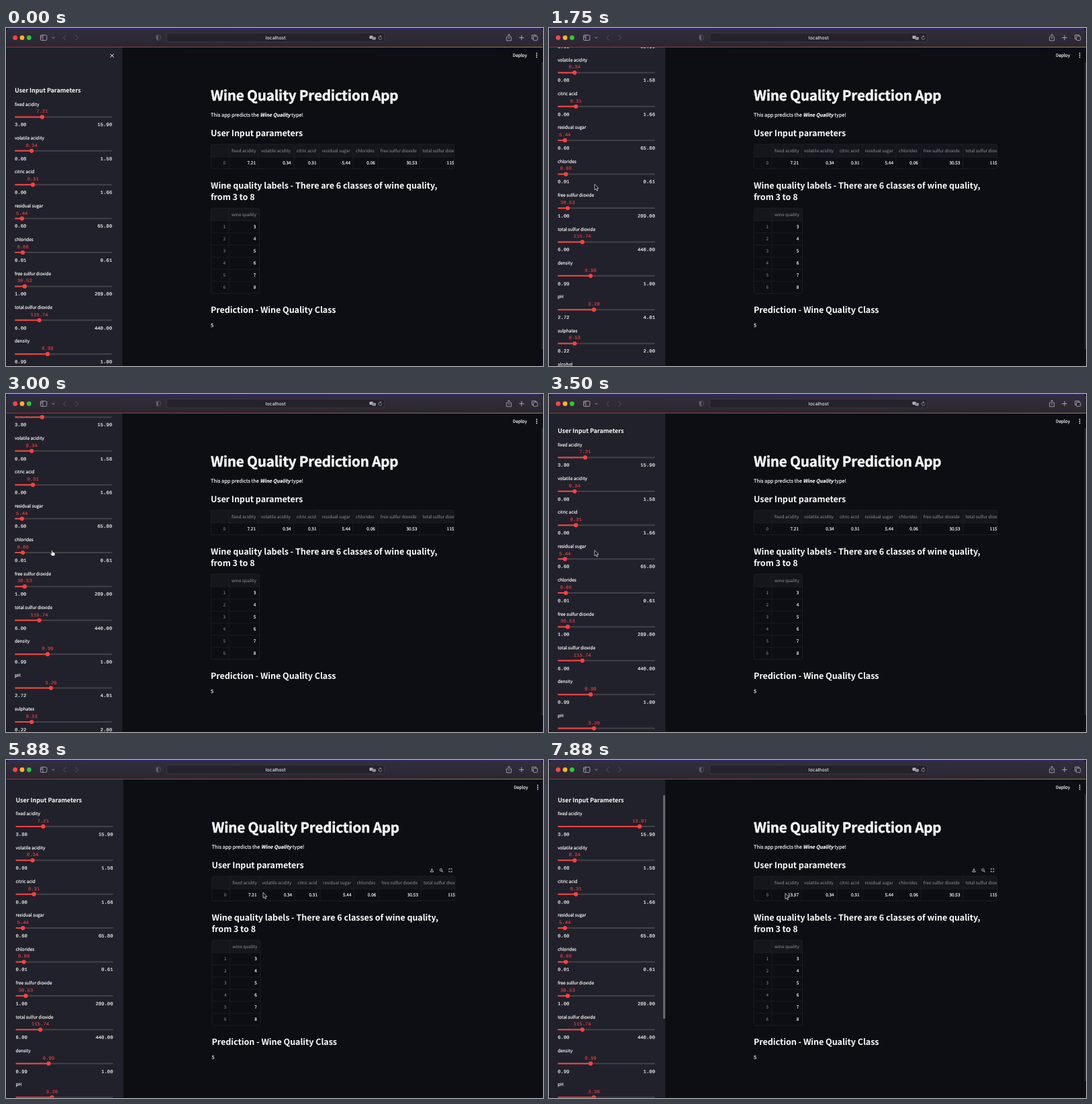
Write an HTML page that moves like this. It is 800 px wide and 503 px high and loops after 8 s.

```html
<!DOCTYPE html>
<html lang="en">
<head>
<meta charset="utf-8">
<title>Wine Quality Prediction App</title>
<style>
html, body { margin: 0; width: 100%; height: 100%; overflow: hidden; background: #0c0e13; }
svg { display: block; width: 800px; height: 503px; text-rendering: geometricPrecision; }
text { font-family: "Noto Sans CJK SC", "Noto Sans CJK JP", "Noto Sans CJK", "Noto Sans", sans-serif;
  font-size: 6.46px; fill: #fafafa; white-space: pre; }
.mono { font-family: "Liberation Mono", monospace; font-size: 7.25px; stroke: #fafafa; stroke-width: .15px; }
.red { fill: #e04043; stroke: #e04043; }
.h1 { font-size: 20.6px; font-weight: 700; letter-spacing: -.17px; stroke: #fafafa; stroke-width: .45px; }
.h2 { font-size: 12.55px; font-weight: 700; letter-spacing: -.06px; }
.h3 { font-size: 9px; font-weight: 700; letter-spacing: -.04px; }
.body { font-size: 7.39px; font-weight: 500; stroke: #fafafa; stroke-width: .15px; }
.em { font-size: 7.2px; font-weight: 700; font-style: italic; }
.cell { font-weight: 500; stroke: #fafafa; stroke-width: .18px; }
.dim { fill: #94969d; }
.ui { font-family: Inter, Roboto, sans-serif; font-size: 6.9px; font-weight: 500; fill: #e6e4ea; }
.end { text-anchor: end; }
.mid { text-anchor: middle; }
.line { fill: none; stroke-linecap: round; stroke-linejoin: round; }
</style>
</head>
<body>
<svg id="stage" viewBox="0 0 800 503" xmlns="http://www.w3.org/2000/svg"></svg>
<script>
const LOOP = 8000, STEP = 125;
const LEFT = 13, TRACK = 145, PITCH = 50.4;
const BG = '#0c0e13';

// name, min, max, value, optional position along the track
const sliders = [
  ['fixed acidity', 3.8, 15.9, 7.21],
  ['volatile acidity', 0.08, 1.58, 0.34],
  ['citric acid', 0, 1.66, 0.31],
  ['residual sugar', 0.6, 65.8, 5.44],
  ['chlorides', 0.01, 0.61, 0.06],
  ['free sulfur dioxide', 1, 289, 30.53],
  ['total sulfur dioxide', 6, 440, 115.74],
  ['density', 0.99, 1, 0.99, 0.338],
  ['pH', 2.72, 4.01, 3.2],
  ['sulphates', 0.22, 2, 0.53],
  ['alcohol', 8, 14.9, 10.5]
];

// keys: time, then values
const scrollKeys = [[1250, 0], [1500, 58], [1750, 116.4], [2125, 178], [2500, 197.8],
  [2625, 197.8], [2750, 176], [3000, 98], [3250, 56], [3500, 38], [3750, 33.5]];
const cursorKeys = [[125, 804, 330], [875, 445, 300], [1250, 68, 232.5], [3625, 68, 232.5],
  [4250, 314.3, 143.5], [4375, 314.3, 143.5], [4750, 72, 95.5], [5125, 72, 95.5],
  [5750, 383, 197], [6000, 383, 197], [6750, 53, 95.5], [6875, 53, 95.5],
  [7375, 134, 95.5], [7625, 290, 150], [7875, 352, 198.3]];
const shiftKeys = [[5125, 0], [5500, 1.5], [6125, 1.5], [6625, 0]];
const acidKeys = [[6875, 7.21], [7375, 13.97]];

function at(keys, t) {
  if (t <= keys[0][0]) return keys[0].slice(1);
  for (let i = 1; i < keys.length; i++) {
    const a = keys[i - 1], b = keys[i];
    if (t <= b[0]) {
      const p = (t - a[0]) / (b[0] - a[0]);
      return a.slice(1).map((v, k) => v + (b[k + 1] - v) * p);
    }
  }
  return keys[keys.length - 1].slice(1);
}

const text = (x, y, s, cls = '', more = '') => `<text x="${x}" y="${y}" class="${cls}" ${more}>${s}</text>`;
const rect = (x, y, w, h, fill, more = '') => `<rect x="${x}" y="${y}" width="${w}" height="${h}" fill="${fill}" ${more}/>`;
const circle = (x, y, r, fill, more = '') => `<circle cx="${x}" cy="${y}" r="${r}" fill="${fill}" ${more}/>`;
const path = (d, stroke, w = 0.8, more = '') => `<path d="${d}" class="line" stroke="${stroke}" stroke-width="${w}" ${more}/>`;

function toolbar() {
  const c = '#b9b6c0', dim = '#58545f';
  return rect(0, 0, 800, 28.2, 'url(#bar)') + rect(0, 0, 800, 1, 'url(#edge)') +
    rect(0, 28, 800, 1, 'url(#deco)') +
    [['#fb4641', 13.6], ['#f5b52e', 24], ['#2fc740', 34.3]].map(([f, x]) => circle(x, 14.4, 3.4, f)).join('') +
    rect(51.4, 10.6, 9.4, 7.8, 'none', `rx="1.5" stroke="${c}" stroke-width=".8"`) +
    path('M54.8 10.8V18.2M52.6 12.6h1M52.6 14.2h1', c, 0.7) +
    path('M68.7 13.7l1.7 1.7 1.7-1.7', c) +
    path('M89 11l-3.4 3.5 3.4 3.5M104 11l3.4 3.5-3.4 3.5', dim, 1) +
    path('M227 10.5l3.2 1.2v3q0 2.6-3.2 4q-3.2-1.4-3.2-4v-3z', dim, 0.8) +
    '<path d="M227 10.5l-3.2 1.2v3q0 2.6 3.2 4z" fill="#625e69"/>' +
    rect(239.4, 7.6, 324.2, 13.2, '#25222c', 'rx="3" stroke="#45414d" stroke-width=".7"') +
    text(401.7, 17, 'localhost', 'ui mid') +
    rect(541.5, 11.4, 5.4, 4.6, c, 'rx="1.2"') + rect(545.4, 13.2, 5.6, 4.6, c, 'rx="1.2" stroke="#25222c" stroke-width=".5"') +
    path('M547 16.7l1.2-2.4 1.2 2.4', '#25222c', 0.5) +
    path('M559.3 13a2.5 2.5 0 1 0 .7 2.1M557.2 11.1l1.5 1.3-1.5 1.2', c, 0.7) +
    path('M747 13h-1.3v5.8h7V13h-1.3M749.2 16V9.6M747.3 11.3l1.9-1.9 1.9 1.9', c) +
    path('M764.7 14.4h6.6M768 11.1v6.6', c, 0.9) +
    path('M785 16.3h-1.3v-5.9h6v1.5', c) + rect(785.6, 12.2, 6.2, 6.2, 'none', `rx="1" stroke="${c}" stroke-width=".8"`);
}

function slider([name, min, max, val, pos], i) {
  const y = 113.4 + PITCH * i;
  const x = LEFT + TRACK * (pos ?? (val - min) / (max - min));
  return text(LEFT, y + 2.2, name, 'cell') +
    text(x, y + 12.9, val.toFixed(2), 'mono red mid', `id="val${i}"`) +
    rect(LEFT, y + 18, TRACK, 2, '#424349', 'rx="1"') +
    rect(LEFT, y + 18, x - LEFT, 2, '#f84242', `rx="1" id="fill${i}"`) +
    circle(x, y + 19, 3.1, '#f84242', `id="knob${i}"`) +
    text(LEFT, y + 32.8, min.toFixed(2), 'mono') +
    text(LEFT + TRACK, y + 32.8, max.toFixed(2), 'mono end');
}

function grid(x, y, w, h, cols, rows) {
  const c = '#22242b';
  let s = rect(x, y, w, h, BG, 'rx="3"') + rect(x, y, w, 19, '#14161c', 'rx="3"');
  for (const cx of cols) s += path(`M${cx} ${y}V${y + h}`, c, 0.6);
  for (let r = 0; r < rows; r++) s += path(`M${x} ${y + 19 + 18 * r}H${x + w}`, c, 0.6);
  return s + rect(x, y, w, h, 'none', `rx="3" stroke="${c}" stroke-width=".7"`);
}

function mainPage() {
  const cols = [332, 376, 428.7, 466.5, 517, 553.8, 616.5];
  let s = text(305, 108.4, 'Wine Quality Prediction App', 'h1') +
    text(305, 131.6, 'This app predicts the <tspan class="em">Wine Quality</tspan> type!', 'body') +
    text(305, 160.8, 'User Input parameters', 'h2') +
    grid(305.3, 173, 362.4, 36.7, cols, 1) +
    text(327, 203.3, '0', 'dim end');
  cols.forEach((x, i) => {
    const [name, , , val] = sliders[i];
    s += text(x + 4, 185.2, name, 'dim', 'clip-path="url(#table)"');
    s += i < 6
      ? text(cols[i + 1] - 4, 203.3, val.toFixed(2), 'cell end', `id="cell${i}"`)
      : text(656.8, 203.3, val.toFixed(2), 'cell', 'clip-path="url(#table)"');
  });
  s += text(305, 238.8, 'Wine quality labels - There are 6 classes of wine quality,', 'h2') +
    text(305, 256, 'from 3 to 8', 'h2') +
    grid(305.3, 268, 72.2, 127, [332], 6) + text(336, 280.2, 'wine quality', 'dim');
  for (let i = 1; i <= 6; i++) {
    const y = 280.4 + 18 * i;
    s += text(327, y, i, 'dim end') + text(372.3, y, i + 2, 'cell end');
  }
  return s + text(305, 424.3, 'Prediction - Wine Quality Class', 'h2') + text(305, 444.6, '5', 'body') +
    text(755, 42.8, 'Deploy', 'cell') +
    [37.6, 40.5, 43.4].map(y => circle(790.6, y, 0.9, '#fafafa')).join('') +
    rect(798.5, 51, 1.2, 427, '#45464d', 'rx=".6"') +
    `<g id="link">${circle(291, 156.3, 7.6, '#1a1c24')}<g transform="rotate(-45 291 156.3)">` +
    path('M290 154.5h-1.6a1.8 1.8 0 0 0 0 3.6h1.6M292 154.5h1.6a1.8 1.8 0 0 1 0 3.6h-1.6M289.4 156.3h3.2', '#c4c5c9', 0.8) + '</g></g>' +
    '<g id="tools">' +
    path('M633 161.6v3M631.6 163.4l1.4 1.4 1.4-1.4M630.8 165.3v1.2h4.4v-1.2', '#dcdde0', 0.8) +
    path('M647.8 165l1.7 1.8', '#dcdde0', 1) + circle(646.5, 163.6, 1.7, 'none', 'stroke="#dcdde0" stroke-width=".8"') +
    path('M658.4 163v-1.2h1.3M661.4 161.8h1.3v1.2M662.7 165.3v1.2h-1.3M659.7 166.5h-1.3v-1.2', '#dcdde0', 0.8) + '</g>';
}

const stage = document.getElementById('stage');
stage.innerHTML = `<defs>
  <linearGradient id="bar" x2="0" y2="1"><stop stop-color="#322e3c"/><stop offset="1" stop-color="#2a2731"/></linearGradient>
  <linearGradient id="edge"><stop stop-color="#281d72"/><stop offset=".5" stop-color="#2f2484"/><stop offset="1" stop-color="#3a2672"/></linearGradient>
  <linearGradient id="deco"><stop stop-color="#a82f38"/><stop offset=".5" stop-color="#9a463c"/><stop offset="1" stop-color="#98853f"/></linearGradient>
  <clipPath id="win"><rect x=".3" y="0" width="799.4" height="502.6" rx="5"/></clipPath>
  <clipPath id="view"><rect x="-5" y="29" width="190" height="474"/></clipPath>
  <clipPath id="table"><rect x="305" y="173" width="362.3" height="37"/></clipPath>
</defs>` +
rect(0, 0, 800, 503, '#15122c') +
'<g clip-path="url(#win)">' + rect(0, 0, 800, 503, BG) +
'<g id="page">' + rect(-5, 28, 178.3, 475, '#21212b') +
'<g clip-path="url(#view)"><g id="list">' +
path('M155.7 38.9l4.6 4.6M160.3 38.9l-4.6 4.6', '#fafafa', 1) +
text(LEFT, 96, 'User Input Parameters', 'h3') + sliders.map(slider).join('') + '</g></g>' +
rect(170, 52, 3.2, 333, '#66676d', 'rx="1.5" id="thumb"') + mainPage() + '</g>' +
toolbar() + '</g>' +
`<g id="cursor">
  <path id="arrow" d="M0 0V8.4L1.9 6.7L3.2 9.7L4.6 9.1L3.3 6.2H5.9Z" fill="#08080a" stroke="#f4f4f4" stroke-width=".7" stroke-linejoin="round"/>
  <path id="hand" d="M-.2 1q0-1 .8-1t.8 1V3q.9-.4 1.4.3q.8-.3 1.2.4q1-.1 1 1V6q0 1.2-.8 2.4H.4Q-.6 7-1.8 5.3q-.3-.9.5-1l1.1.8z" fill="#fff" stroke="#111" stroke-width=".6" stroke-linejoin="round"/>
</g>`;

const el = id => document.getElementById(id);
const show = (id, on) => el(id).setAttribute('visibility', on ? 'visible' : 'hidden');
const move = (id, x, y) => el(id).setAttribute('transform', `translate(${x.toFixed(2)} ${y.toFixed(2)})`);

function draw(now) {
  const t = Math.floor((now % LOOP) / STEP) * STEP;
  const [scroll] = at(scrollKeys, t), [shift] = at(shiftKeys, t);
  const [x, y] = at(cursorKeys, t), [acid] = at(acidKeys, t);

  move('list', 0, -scroll);
  move('page', shift, 0);
  move('cursor', x, y);

  const knob = LEFT + TRACK * (acid - 3.8) / 12.1;
  el('knob0').setAttribute('cx', knob);
  el('fill0').setAttribute('width', knob - LEFT);
  el('val0').setAttribute('x', knob);
  el('val0').textContent = acid.toFixed(2);
  el('cell0').textContent = t >= 7625 ? '13.97' : '7.21';

  const onTrack = x > 10 && x < 160 &&
    sliders.some((_, i) => Math.abs(132.4 + PITCH * i - scroll - y - 3.6) < 4);
  show('hand', onTrack);
  show('arrow', !onTrack);
  show('link', x > 285 && x < 668 && y > 143 && y < 170);
  show('tools', x > 305 && x < 668 && y > 172 && y < 210);
  show('thumb', t >= 6625);
}

function tick() {
  draw(performance.now());
  requestAnimationFrame(tick);
}
tick();
</script>
</body>
</html>
```
